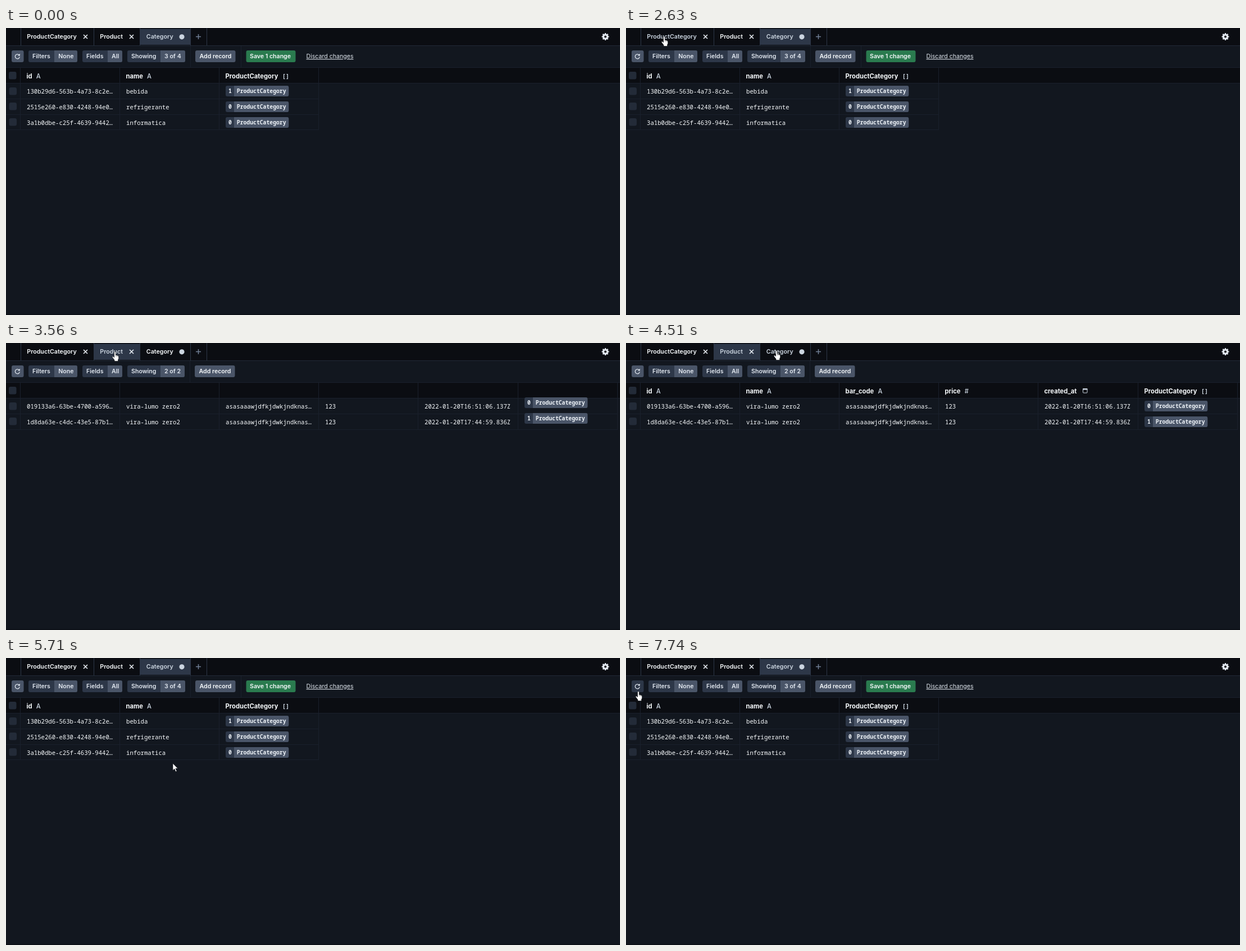
These frames come from a looping animation (1093 by 512 pixels, 8 s). An HTML page:

```html
<!DOCTYPE html>
<html lang="en">
<head>
<meta charset="utf-8">
<title>Record browser</title>
<style>
html, body { margin: 0; width: 100%; height: 100%; overflow: hidden; background: #12171f; }
svg { display: block; width: 1093px; height: 512px; }
text { font: 600 10.6px Inter, sans-serif; fill: #f7fafc; white-space: pre; }
.tabText { font-size: 10.7px; }
.head { font-size: 11.2px; font-weight: 700; }
.type { font-weight: 500; fill: #cbd5e0; }
.sign { font: 600 10.6px "Noto Sans Mono", monospace; fill: #cbd5e0; }
.mono { font: 500 10.65px "Noto Sans Mono", monospace; }
.chip { font: 600 9.75px "Noto Sans Mono", monospace; fill: #edf2f7; }
.btn { fill: #e2e8f0; }
.link { font-weight: 400; fill: #e2e8f0; text-decoration: underline; }
</style>
</head>
<body>
<svg id="stage" viewBox="0 0 1093 512"></svg>
<script>
const LOOP = 8000;
const DARK = '#0b0d12', LINE = '#1a202c', SLATE = '#2d3748', GREY = '#4a5568', PALE = '#cbd5e0', WHITE = '#f7fafc';
const COLS = [25, 202, 379, 556, 733, 911, 1088];
const ROW_TOPS = [98, 126, 154, 181];

const rect = (x, y, w, h, fill, more = '') =>
  `<rect x="${x}" y="${y}" width="${w}" height="${h}" fill="${fill}" ${more}/>`;
const text = (x, y, s, cls = '', more = '') => `<text x="${x}" y="${y}" class="${cls}" ${more}>${s}</text>`;
const path = (d, stroke, width, more = '') =>
  `<path d="${d}" fill="none" stroke="${stroke}" stroke-width="${width}" ${more}/>`;

// A rounded label whose right part, from `split`, is lighter.
const pill = (x, split, end, y, h) =>
  rect(x, y, end - x, h, SLATE, 'rx="3"') +
  `<path d="M${split} ${y}H${end - 3}q3 0 3 3V${y + h - 3}q0 3 -3 3H${split}Z" fill="${GREY}"/>`;

const relation = (x, y, cell) => {
  const count = cell.count !== undefined;
  const split = x + (count ? 15 : 0), end = split + 9.5 + cell.label.length * 5.85;
  return pill(x, split, end, y, 19) +
    (count ? text(x + 5, y + 13, cell.count, 'chip') : '') + text(split + 4.8, y + 13, cell.label, 'chip');
};
const links = count => ({ count, label: 'ProductCategory' });

const tables = {
  category: {
    tab: 2, shown: '3 of 4', dirty: true,
    heads: [['id', 'A'], ['name', 'A'], ['ProductCategory', '[]']],
    rows: [
      ['130b29d6-563b-4a73-8c2e…', 'bebida', links(1)],
      ['2515e260-e830-4248-94e0…', 'refrigerante', links(0)],
      ['3a1b0dbe-c25f-4639-9442…', 'informatica', links(0)]
    ]
  },
  product: {
    tab: 1, shown: '2 of 2',
    heads: [['id', 'A'], ['name', 'A'], ['bar_code', 'A'], ['price', '#'], ['created_at', 'date'], ['ProductCategory', '[]']],
    rows: [
      ['019133a6-63be-4700-a596…', 'vira-lumo zero2', 'asasaaawjdfkjdwkjndknas…', '123', '2022-01-20T16:51:06.137Z', links(0)],
      ['1d8da63e-c4dc-43e5-87b1…', 'vira-lumo zero2', 'asasaaawjdfkjdwkjndknas…', '123', '2022-01-20T17:44:59.836Z', links(1)]
    ]
  },
  link: {
    tab: 0, shown: '1 of 1',
    heads: [['id', 'A'], ['product', '{}'], ['id_product', 'A'], ['category', '{}'], ['id_category', 'A']],
    rows: [['7c40e1b2-91fd-4e06-b3a8…', { label: 'Product' }, '1d8da63e-c4dc-43e5-87b1…', { label: 'Category' }, '130b29d6-563b-4a73-8c2e…']]
  }
};

const checkbox = (x, y) => rect(x, y, 13.5, 13.5, '#232b38', 'rx="3"');

function heading([name, type], i) {
  const x = COLS[i] + 11.5;
  if (type !== 'date') {
    const cls = type.length > 1 ? 'sign' : 'type';
    return text(x, 89.5, `${name}<tspan class="${cls}" dx="7.2">${type}</tspan>`, 'head');
  }
  return text(x, 89.5, name, 'head') + rect(813.5, 81.5, 7.5, 7.5, 'none', `rx="1" stroke="${PALE}"`) +
    rect(813, 81, 8.5, 2.5, PALE, 'rx="1"');
}

function tableMarkup(name, { heads, rows, shown, dirty }) {
  const edge = COLS[heads.length], bottom = ROW_TOPS[rows.length];
  const shift = dirty ? 0 : -1;
  let out = rows.map((row, r) =>
    rect(0, ROW_TOPS[r], edge, ROW_TOPS[r + 1] - ROW_TOPS[r], '#1a202c', 'class="hover" visibility="hidden"')).join('');
  for (let c = 0; c <= heads.length; c++) out += rect(COLS[c], 71, 1, bottom - 71, LINE);
  rows.forEach((row, r) => {
    const y = ROW_TOPS[r];
    out += rect(0, ROW_TOPS[r + 1], edge + 1, 1, LINE) + checkbox(5.5, y + 8 - (r ? 1 : 0));
    row.forEach((cell, c) => {
      if (typeof cell === 'string') out += text(COLS[c] + 12, y + 18.8, cell, 'mono');
    });
  });
  const chips = rows.map((row, r) => row.map((cell, c) =>
    typeof cell === 'string' ? '' : relation(COLS[c] + 12, ROW_TOPS[r] + 5, cell)).join('')).join('');
  out += `<g class="chips">${chips}</g><g class="heads">${heads.map(heading).join('')}</g>`;
  out += pill(216, 275, 319 + shift, 40, 21) + text(223, 54.2, 'Showing', 'btn') + text(282, 54.2, shown, 'btn');
  out += rect(328 + shift, 32, 1, 38, LINE) + rect(337 + shift, 40, 71.5, 21, GREY, 'rx="3"') +
    text(344.5 + shift, 54.2, 'Add record');
  if (dirty) {
    out += rect(418, 32, 1, 38, LINE) + rect(427.5, 40, 88, 21, '#2a7b4f', 'rx="3"') +
      text(434, 54.2, 'Save 1 change') + text(534.5, 54.2, 'Discard changes', 'link');
  }
  return `<g id="${name}">${out}</g>`;
}

const TABS = [[26, 156, 'ProductCategory', 37.3], [156, 238, 'Product', 167.3], [238, 328, 'Category', 249.8]];
const cross = x => path(`M${x - 3.5} 12l7 7m0-7l-7 7`, '#e2e8f0', 1.7);

const stage = document.getElementById('stage');
stage.innerHTML =
  rect(0, 0, 1093, 512, '#12171f') + rect(0, 510, 1093, 2, '#0d1118') +
  rect(0, 0, 1093, 31, DARK) + rect(0, 31, 1093, 1, '#222a37') +
  TABS.map(([x, end]) => rect(x, 1.5, end - x, 28.5, 'none', 'class="tab"')).join('') +
  [26, 156, 238, 328, 357].map(x => rect(x, 0, 1, 31, SLATE)).join('') +
  TABS.map(([, , label, x]) => text(x, 19.3, label, 'tabText')).join('') +
  cross(141.5) + cross(223.5) + `<circle cx="313" cy="15.8" r="4.6" fill="${PALE}"/>` +
  path('M338 15.5h9m-4.5-4.5v9', '#718096', 1.5) +
  `<g transform="translate(1067 15.5)" fill="none" stroke="#e2e8f0"><circle r="3.6" stroke-width="3.2"/>
   <circle r="5.5" stroke-width="2" pathLength="16" stroke-dasharray="1 1" stroke-dashoffset=".5"/></g>` +
  rect(10, 40, 21.5, 21, GREY, 'rx="3" id="refresh"') +
  path('M23.4 48.2A4 4 0 1 0 24.3 51.5', '#e2e8f0', 1.3) + '<path d="M24.8 45.8V49.6H21Z" fill="#e2e8f0"/>' +
  pill(40, 86, 127, 40, 21) + text(47, 54.2, 'Filters', 'btn') + text(93.3, 54.2, 'None', 'btn') +
  pill(136, 181, 207, 40, 21) + text(143, 54.2, 'Fields', 'btn') + text(188, 54.2, 'All', 'btn') +
  rect(0, 70, 1093, 1, LINE) + rect(0, 71, 1093, 27, DARK) + rect(0, 98, 1093, 1, LINE) + checkbox(5, 78) +
  Object.entries(tables).map(([name, table]) => tableMarkup(name, table)).join('') +
  `<path id="arrow" d="M0 0V12.5L2.9 9.8 5 14.8 7 14 4.9 9.1H8.8Z" fill="#fff" stroke="#0b0d12" stroke-width=".6"/>
   <g id="hand"><path d="M3.6 1.4Q5 -.4 6.4 1.4V6.5L8 6.6 9.5 7.2 11 7.8 11.7 9V12.5L10.6 15V17.6H4V15.5L.3 10.6Q-.3 8.6 1.6 8.9L3.6 10.6Z"
   fill="#fff" stroke="#0b0d12" stroke-width=".7"/><path d="M6.4 7v2.5M8.2 7v2.5M10 7.8v2" stroke="#555" stroke-width=".5"/></g>`;

const $ = id => document.getElementById(id);
const all = selector => [...stage.querySelectorAll(selector)];
const show = (el, on) => el.setAttribute('visibility', on ? 'visible' : 'hidden');
const views = Object.keys(tables).map(name => ({
  name, group: $(name),
  hovers: all(`#${name} .hover`), heads: all(`#${name} .heads`)[0], chips: all(`#${name} .chips`)[0]
}));
const tabs = all('.tab'), tabTexts = all('.tabText');

// Pointer moves: start, end, steps, then evenly timed waypoints.
const MOVES = [
  [510, 1130, 10, [640, 470], [520, 350], [390, 220], [300, 143]],
  [1200, 1200, 1, [300, 143], [296, 216]],
  [1410, 1750, 6, [296, 216], [150, 100], [5, -20]],
  [2080, 2480, 6, [50, -12], [66, 12], [68, 14]],
  [2630, 3360, 9, [68, 14], [68, 14], [130, 15], [194, 14]],
  [3840, 4580, 10, [194, 14], [231, 15], [268, 12], [268, 12]],
  [4840, 5440, 9, [268, 12], [290, 110], [336, 254]],
  [5640, 6260, 10, [336, 254], [297, 188], [240, 130], [180, 85], [130, 52], [103, 44]],
  [6790, 6860, 2, [103, 44], [50, 44]],
  [7060, 7200, 3, [50, 44], [22, 58]]
];

// Time, table, whether it is still loading.
const SCENES = [
  [0, 'category'], [2760, 'link', true], [2830, 'link'],
  [3490, 'product', true], [3630, 'product'], [4580, 'category']
];

const latest = (list, t) => list.filter(item => item[0] <= t).pop();

function along(points, p) {
  const s = p * (points.length - 1), i = Math.min(Math.floor(s), points.length - 2);
  return points[i].map((v, k) => v + (points[i + 1][k] - v) * (s - i));
}

// The page reacts to the pointer one step late.
function pointer(t) {
  const move = latest(MOVES, t);
  if (!move) return { now: [-99, -99], before: [-99, -99] };
  const [start, end, steps, ...points] = move;
  const passed = (t - start) / (end - start || 1) * (steps - 1);
  const step = 1 + Math.min(steps - 1, Math.floor(passed + 1e-6));
  return { now: along(points, step / steps), before: along(points, (step - 1) / steps) };
}

function draw(t) {
  const [, current, loading] = latest(SCENES, t);
  const { now: [x, y], before: [hx, hy] } = pointer(t);
  const { tab, heads } = tables[current];

  for (const { name, group, hovers, heads: headGroup, chips } of views) {
    group.setAttribute('display', name === current ? 'inline' : 'none');
    headGroup.setAttribute('display', loading ? 'none' : 'inline');
    chips.setAttribute('transform', `translate(0 ${loading ? -6 : 0})`);
    hovers.forEach((el, r) => show(el, hx >= 0 && hx < COLS[heads.length] && hy >= ROW_TOPS[r] && hy < ROW_TOPS[r + 1]));
  }
  TABS.forEach(([left, right], i) => {
    const over = y >= 0 && y < 31 && x >= left && x < right;
    tabs[i].setAttribute('fill', i === tab ? SLATE : 'none');
    tabTexts[i].style.fill = i === tab || over ? PALE : WHITE;
  });

  const onButton = y >= 40 && y < 61 && ((x >= 10 && x < 31) || (x >= 40 && x < 127) || (x >= 136 && x < 207));
  const hand = onButton || (y < 31 && x >= 26 && x < 357);
  $('refresh').setAttribute('fill', onButton && x < 31 ? SLATE : GREY);
  show($('hand'), hand);
  show($('arrow'), !hand);
  $('hand').setAttribute('transform', `translate(${x - 5} ${y + 1})`);
  $('arrow').setAttribute('transform', `translate(${x} ${y})`);
}

const begin = performance.now();
function tick() {
  draw((performance.now() - begin) % LOOP);
  requestAnimationFrame(tick);
}
tick();
</script>
</body>
</html>
```
